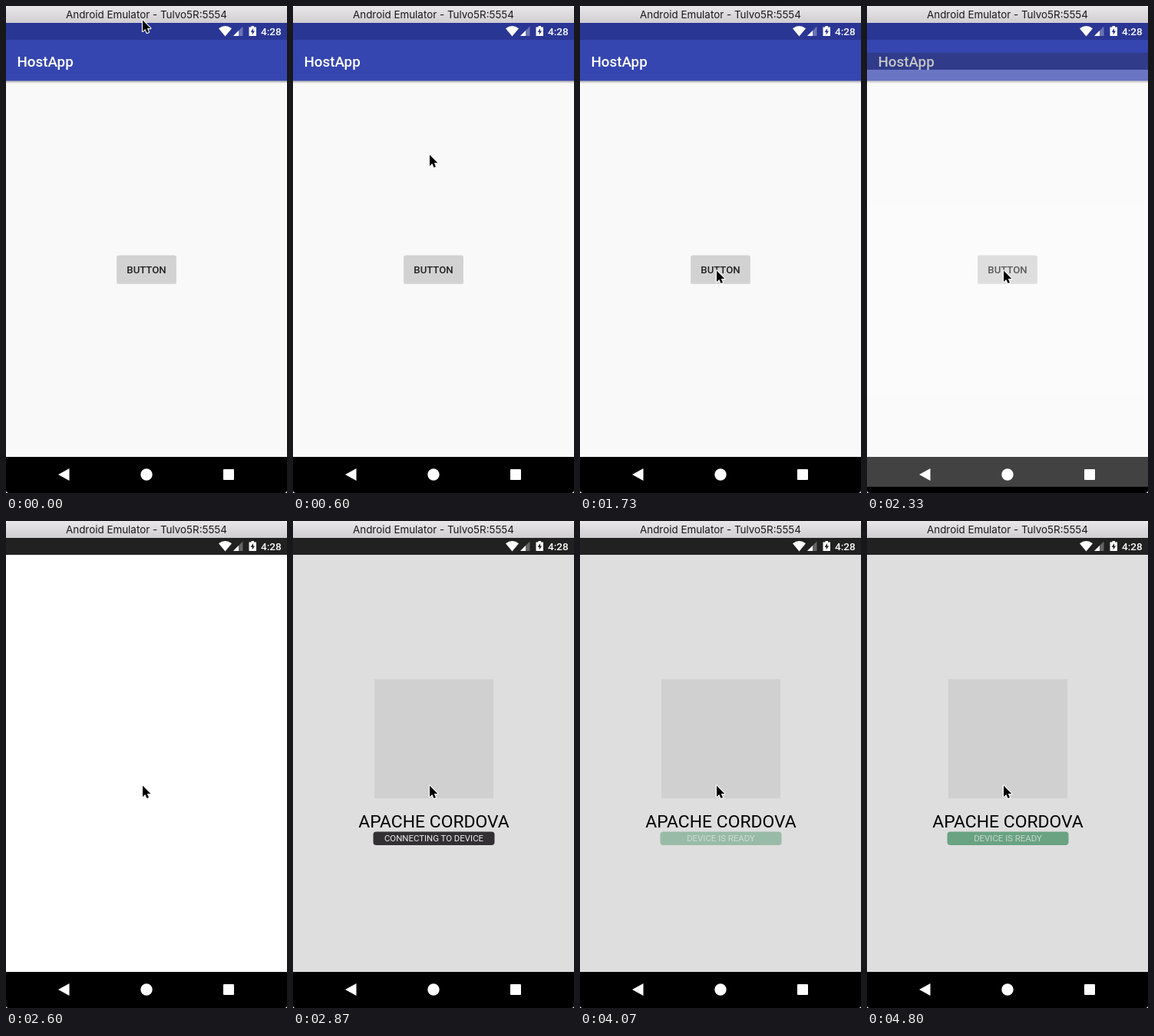
An HTML page that plays this animation: 366 px wide and 634 px high, repeating every 4.87 s.

```html
<!DOCTYPE html>
<html lang="en">
<head>
<meta charset="utf-8">
<title>Emulator</title>
<style>
  html, body { margin: 0; width: 100%; height: 100%; overflow: hidden; background: #fff; }
  svg { display: block; width: 366px; height: 634px; font-family: Roboto, sans-serif; }
  .mid { text-anchor: middle; }
  .medium { font-weight: 500; }
</style>
</head>
<body>
<svg viewBox="0 0 366 634">
  <defs>
    <linearGradient id="chrome" x2="0" y2="1">
      <stop stop-color="#e9e7e9"/><stop offset="1" stop-color="#d0ced0"/>
    </linearGradient>
    <linearGradient id="shade" x2="0" y2="1">
      <stop stop-opacity=".3"/><stop offset="1" stop-opacity="0"/>
    </linearGradient>
    <clipPath id="frame"><rect width="366" height="634" rx="4"/></clipPath>
  </defs>
  <g clip-path="url(#frame)">
    <g id="host">
      <rect y="22" width="366" height="612" fill="#f9f9f9"/>
      <rect y="22" width="366" height="22" fill="#2a3694"/>
      <rect y="44" width="366" height="53.5" fill="#3646b0"/>
      <rect y="97.5" width="366" height="3.5" fill="url(#shade)"/>
      <text class="medium" x="14.5" y="78.5" font-size="18.8" fill="#fff">HostApp</text>
      <rect x="144" y="325" width="78" height="37" rx="2" opacity=".14"/>
      <rect x="145" y="324.5" width="76" height="35.5" rx="2" fill="#d2d2d2"/>
      <text class="mid medium" x="183" y="347.5" font-size="13.2" fill="#222">BUTTON</text>
      <rect y="587" width="366" height="47"/>
    </g>
    <g id="page">
      <rect y="22" width="366" height="22" fill="#212121"/>
      <rect id="sheet" y="44" width="366" height="543" fill="#fff"/>
      <rect y="587" width="366" height="47"/>
    </g>
    <g id="splash">
      <rect x="106" y="206" width="155" height="155" fill="#d0d0d0"/>
      <text class="mid" x="183.5" y="399" font-size="22.9">APACHE CORDOVA</text>
      <g id="badge">
        <rect id="pill" x="104.5" y="404.5" width="158" height="17.5" rx="4"/>
        <text id="label" class="mid" x="183.5" y="417.3" font-size="11.4"></text>
      </g>
    </g>
    <rect width="366" height="22" fill="url(#chrome)"/>
    <text class="mid" x="183" y="16" font-size="13.4" font-family="Inter, sans-serif" fill="#1a1a1a">Android Emulator - Tulvo5R:5554</text>
    <g fill="#fff">
      <path d="M285.5 39.5 277 29.2Q285.5 23 294 29.2Z"/>
      <path d="M308.5 26.5V39H296Z" opacity=".3"/>
      <path d="M303 32V39H296Z"/>
      <path d="M319.5 26h3.5v1.5h3V39h-9.5V27.5h3Z"/>
      <path id="bolt" d="M322 29 318.7 34h2v3.5l3.4-5h-2.1Z"/>
      <text class="medium" x="332" y="38" font-size="13.6">4:28</text>
      <path d="M68 610 82.5 602v16Z"/>
      <circle cx="183" cy="610" r="7.7"/>
      <rect x="283" y="603" width="14" height="14" rx="1"/>
    </g>
    <path id="cursor" d="M0 0V14.5L3.3 11.4 5.6 16.6 8 15.5 5.8 10.6H10.3Z"
      stroke="#fff" stroke-width="2.2" stroke-linejoin="round" paint-order="stroke"/>
  </g>
</svg>
<script>
const $ = id => document.getElementById(id);
const set = (id, attrs) => {
  for (const name in attrs) $(id).setAttribute(name, attrs[name]);
};
const clamp = x => Math.max(0, Math.min(1, x));
const span = (t, from, length) => clamp((t - from) / length);
const easeOut = (p, power) => 1 - (1 - p) ** power;
const easeInOut = p => p < .5 ? 4 * p ** 3 : 1 - 4 * (1 - p) ** 3;

// CSS "ease": cubic-bezier(.25, .1, .25, 1)
function ease(x) {
  let lo = 0, hi = 1, u = .5;
  for (let i = 0; i < 20; i++) {
    u = (lo + hi) / 2;
    if (.75 * u * (1 - u) + u ** 3 < x) lo = u; else hi = u;
  }
  return .3 * u * (1 - u) ** 2 + 3 * u * u * (1 - u) + u ** 3;
}

function blink(elapsed) {
  const phase = elapsed % 3000 / 1500;
  return phase < 1 ? 1 - .53 * ease(phase) : .47 + .53 * ease(phase - 1);
}

const LOOP = 4870, STEP = 1000 / 15;
const OPEN = 2319, LOADED = 2860, READY = 3130;

function draw(now) {
  const t = Math.floor((now % LOOP + 4) / STEP) * STEP;

  const y = 18.5 + 326 * easeInOut(span(t, 200, 780));
  set('cursor', { transform: `translate(178 ${y})` });

  const drop = 48 * (1 - easeOut(span(t, OPEN, 350), 5));
  const opacity = easeOut(span(t, OPEN, 200), 4);
  set('page', { opacity, transform: `translate(0 ${drop})` });
  set('bolt', { fill: opacity > .5 ? '#212121' : '#2a3694' });

  const loaded = t >= LOADED, ready = t >= READY;
  set('sheet', { fill: loaded ? '#dedede' : '#fff' });
  set('splash', { visibility: loaded ? 'visible' : 'hidden' });
  set('badge', { opacity: blink(Math.max(0, t - 2770)) });
  set('pill', { fill: ready ? '#4b946a' : '#2e2c2e' });
  set('label', { fill: ready ? '#c4d4cb' : '#eee' });
  $('label').textContent = ready ? 'DEVICE IS READY' : 'CONNECTING TO DEVICE';
}

const start = performance.now();
function tick() {
  draw(performance.now() - start);
  requestAnimationFrame(tick);
}
tick();
</script>
</body>
</html>
```
